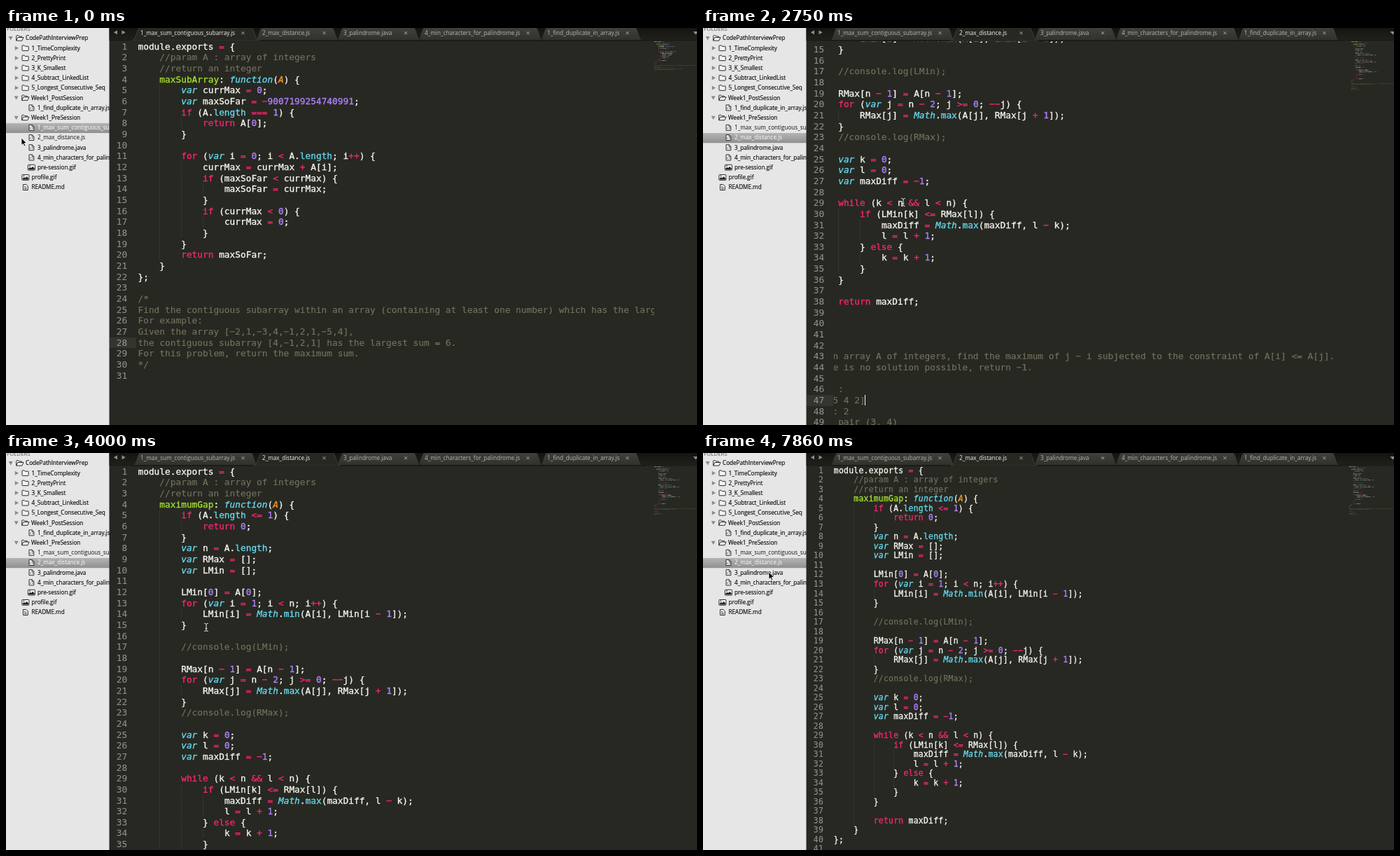
Write an HTML page that moves like this. It is 987 px wide and 567 px high and loops after 8000 ms.

```html
<!DOCTYPE html>
<html lang="en">
<head>
<meta charset="utf-8">
<title>Code editor</title>
<style>
html, body { margin: 0; width: 100%; height: 100%; overflow: hidden; background: #272822; }
#stage {
  position: relative; width: 987px; height: 567px; overflow: hidden;
  animation: edit 8s step-end infinite;
}
svg { position: absolute; left: 0; top: 0; }
svg text { font: 8.15px "Open Sans", "Noto Sans", sans-serif; white-space: pre; }
#tree text { stroke: currentColor; stroke-width: .18px; color: #111; }
#tree text[class] { stroke: none; }

/* editor: scroll position, type size and which document is open */
@keyframes edit {
  0% {
    --a: visible; --b: hidden; --row-a: #fff; --row-b: #111; --tab-a: #f4f4f0; --tab-b: #b8b8b3;
    --sx: 0px; --sy: 0px; --fs: 12.8px; --adv: 7.71px; --lh: 15.65px; --cx: 188.5px; --mx: 926px;
  }
  20.75% {
    --a: hidden; --b: visible; --row-a: #111; --row-b: #fff; --tab-a: #b8b8b3; --tab-b: #f4f4f0;
    --sx: -57px; --sy: -215px;
  }
  36.25% { --sx: -49px; --sy: -62.6px; }
  38.125% { --sx: -45.6px; --sy: 0px; }
  47.75% { --sx: -38px; }
  50% { --sx: 0px; --fs: 12.8px; --adv: 7.71px; --lh: 15.65px; --cx: 188.5px; --mx: 926px; }
  69.5% { --fs: 12.1px; --adv: 7.29px; --lh: 14.94px; --cx: 187.6px; --mx: 923px; }
  80.75%, 100% {
    --a: hidden; --b: visible; --row-a: #111; --row-b: #fff; --tab-a: #b8b8b3; --tab-b: #f4f4f0;
    --sx: 0px; --sy: 0px; --fs: 11.38px; --adv: 7.12px; --lh: 13.52px; --cx: 186.8px; --mx: 923px;
  }
}
.a { visibility: var(--a); }
.b { visibility: var(--b); }
.row-a { fill: var(--row-a); }
.row-b { fill: var(--row-b); }
.tab-a { fill: var(--tab-a); }
.tab-b { fill: var(--tab-b); }

.gutter, .pane { position: absolute; top: 19px; height: 548px; overflow: hidden; }
.gutter { left: 148px; width: 38px; }
.pane { left: 187px; width: calc(var(--mx) - 187px); }
pre {
  position: absolute; margin: 0; top: calc(var(--sy) - .2px); color: #f8f8f2;
  font: var(--fs)/var(--lh) "DejaVu Sans Mono", "Liberation Mono", monospace;
  letter-spacing: calc(var(--adv) - var(--fs) * .60205);
  -webkit-text-stroke: .32px currentColor;
}
.nums { left: 9.8px; color: #8f908a; -webkit-text-stroke-width: .1px; }
.code { left: calc(var(--cx) - 187px + var(--sx)); }
.mini {
  --fs: 12.8px; --adv: 7.71px; --lh: 15.65px;
  left: var(--mx); top: 18.7px; opacity: .9;
  transform: scale(.0923, .0909); transform-origin: 0 0;
}
.current {
  position: absolute; left: 0; width: 38px; height: var(--lh); background: #34352f;
  top: calc(var(--sy) + .2px + var(--lh) * (var(--n) - 1));
}
.caret {
  position: absolute; left: calc(var(--adv) * 13 - .6px); top: calc(var(--lh) * 46);
  width: 1.2px; height: 15.6px; background: #f8f8f0; animation: blink 8s step-end infinite;
}
@keyframes blink {
  0% { opacity: 0; } 20.75% { opacity: 1; } 27.125% { opacity: 0; }
  32.625% { opacity: .5; } 34.375%, 100% { opacity: 1; }
}
.code i { box-shadow: inset 1px 0 #34352e; }
.cm { color: #75715e; -webkit-text-stroke-width: .15px; }
.kw { color: #f92672; }
.ty, .fn { color: #66d9ef; }
.num { color: #ae81ff; }
.name { color: #a6e22e; }
.arg { color: #fd971f; }
.ty, .arg { font-style: italic; }

#pointer { animation: point 8s step-end infinite; }
#pointer .arrow { visibility: var(--arrow); }
#pointer .beam { visibility: var(--beam); }
@keyframes point {
  0% { transform: translate(22px, 157px); --arrow: visible; --beam: hidden; }
  1.75% { transform: translate(75.5px, 149px); }
  4% { transform: translate(85px, 152px); }
  5.875% { transform: translate(85px, 153.7px); }
  9.625% { transform: translate(85px, 154.7px); }
  11.375% { transform: translate(85.5px, 155.7px); }
  29% { transform: translate(212px, 212px); --arrow: hidden; --beam: visible; }
  30.75% { transform: translate(286px, 249px); }
  86.75% { transform: translate(262px, 247.5px); }
  88.875% { transform: translate(204px, 200px); }
  92.625% { transform: translate(104px, 187px); --arrow: visible; --beam: hidden; }
  94.5% { transform: translate(99px, 182px); }
  96.375% { transform: translate(94.5px, 172px); }
  98.25%, 100% { transform: translate(94px, 170px); --arrow: visible; --beam: hidden; }
}
</style>
</head>
<body>
<div id="stage">
  <svg width="987" height="567">
    <defs>
      <linearGradient id="pick" x2="0" y2="1"><stop stop-color="#b4b4b4"/><stop offset="1" stop-color="#909090"/></linearGradient>
      <linearGradient id="bar" x2="0" y2="1"><stop stop-color="#141511"/><stop offset="1" stop-color="#20211c"/></linearGradient>
      <linearGradient id="tab" x2="0" y2="1"><stop stop-color="#40413c"/><stop offset="1" stop-color="#30312c"/></linearGradient>
      <g id="file" fill="#fafafa" stroke="#222" stroke-width=".95">
        <path d="M.5-4H4.8L7.3-1.6V4H.5Z"/>
        <path d="M4.6-4V-1.4H7.3M3-.4L1.9.9 3 2.2M4.8-.4L5.9.9 4.8 2.2" fill="none" stroke-width=".8"/>
      </g>
      <g id="note" fill="#fafafa" stroke="#222" stroke-width=".95">
        <path d="M.5-4H4.8L7.3-1.6V4H.5Z"/>
        <path d="M2-1.2H4M2 .6H5.8M2 2.3H5.8" stroke-width=".8"/>
      </g>
      <path id="closed" d="M.5 3V-3Q.5-3.8 1.3-3.8H3.6L4.8-2.5H9Q9.7-2.5 9.7-1.8V3Q9.7 3.7 9 3.7H1.2Q.5 3.7 .5 3Z" fill="#f4f4f4" stroke="#222" stroke-width=".95"/>
      <path id="open" d="M.7 3.5V-3.1Q.7-3.8 1.4-3.8H3.6L4.8-2.5H8.3V-1M.7 3.5L2.8-1H11L8.9 3.6H.7Z" fill="#f4f4f4" stroke="#222" stroke-width=".95"/>
      <g id="image">
        <rect x=".4" y="-3.8" width="10" height="7.8" rx=".8" fill="#fafafa" stroke="#222" stroke-width=".95"/>
        <path d="M1.2 3.2V1.6L3.4-.4 5 1 7.2-1.4 9.6 1.4V3.2Z" fill="#222"/>
        <circle cx="3" cy="-2" r=".9" fill="#222"/>
      </g>
    </defs>
    <rect width="148" height="567" fill="#e6e6e6"/>
    <rect class="a" y="135.8" width="148" height="14.2" fill="url(#pick)"/>
    <rect class="b" y="150" width="148" height="14.2" fill="url(#pick)"/>
    <text x="1" y="3.7" fill="#777" style="font-size:7.8px;font-weight:600">FOLDERS</text>
    <g id="tree"></g>
    <rect x="147.5" width="840" height="567" fill="#272822"/>
    <rect x="147.5" width="840" height="18" fill="url(#bar)"/>
    <path d="M159 3.2V9.2L153.8 6.2ZM165.5 3.2V9.2L170.7 6.2ZM981.5 5H989L985.2 9.5Z" fill="#8d8e89"/>
    <g id="tabs"></g>
  </svg>
  <div id="docs"></div>
  <svg width="987" height="567">
    <g id="pointer">
      <path class="arrow" d="M0 0V10.4L2.4 8.2 4 11.8 5.8 11 4.2 7.5H7.5Z" fill="#000" stroke="#fff" stroke-width=".8"/>
      <path class="beam" d="M-2.7-5.6Q0-5.6 0-4.2Q0-5.6 2.7-5.6M0-4.4V4.4M-2.7 5.6Q0 5.6 0 4.2Q0 5.6 2.7 5.6M-1.5 1.8H1.5" fill="none" stroke="#e8e8e4" stroke-width="1"/>
    </g>
  </svg>
</div>
<script>
const byId = id => document.getElementById(id);

// sidebar: icon, text x, label, row class
const rows = [
  ['open', 28, 'CodePathInterviewPrep'],
  ['closed', 36.5, '1_TimeComplexity'],
  ['closed', 36.5, '2_PrettyPrint'],
  ['closed', 36.5, '3_K_Smallest'],
  ['closed', 36.5, '4_Subtract_LinkedList'],
  ['closed', 36.5, '5_Longest_Consecutive_Seq'],
  ['open', 36, 'Week1_PostSession'],
  ['file', 45, '1_find_duplicate_in_array.js'],
  ['open', 36, 'Week1_PreSession'],
  ['file', 45, '1_max_sum_contiguous_subarray.js', 'row-a'],
  ['file', 45, '2_max_distance.js', 'row-b'],
  ['file', 45, '3_palindrome.java'],
  ['file', 45, '4_min_characters_for_palindrome.js'],
  ['image', 45, 'pre-session.gif'],
  ['image', 36.5, 'profile.gif'],
  ['note', 36.5, 'README.md']
];
const arrows = { open: 'M-3-2.4H3L0 2.9Z', closed: 'M-2.4-3V3L2.9 0Z' };

byId('tree').innerHTML = rows.map(([icon, x, label, cls], i) => {
  const y = 14.5 + 14.2 * i;
  const gap = icon === 'file' || icon === 'note' ? 12.5 : 14;
  const arrow = arrows[icon]
    ? `<path d="${arrows[icon]}" transform="translate(${x - 21.3} ${y})" fill="#8a8a8a"/>` : '';
  return `${arrow}<use href="#${icon}" x="${x - gap}" y="${y}"/>
    <text ${cls ? `class="${cls}"` : ''} x="${x}" y="${y + 2.8}" fill="#111">${label}</text>`;
}).join('');

// tabs: label, text x, close button x, text class, open class
const tabs = [
  ['1_max_sum_contiguous_subarray.js', 192, 338.5, 'tab-a', 'a'],
  ['2_max_distance.js', 366, 454.5, 'tab-b', 'b'],
  ['3_palindrome.java', 482, 571],
  ['4_min_characters_for_palindrome.js', 598, 745.5],
  ['1_find_duplicate_in_array.js', 773, 887.5]
];
const tabPath = (x, close) => {
  const l = x - 12, r = close + 23;
  return `M${l} 18C${l + 7} 17 ${l + 6}-1 ${l + 13}-1H${r - 13}C${r - 6}-1 ${r - 7} 17 ${r} 18Z`;
};
const shape = (tab, attrs) => `<path d="${tabPath(tab[1], tab[2])}" ${attrs}/>`;

byId('tabs').innerHTML =
  [...tabs].reverse().map(t => shape(t, 'fill="url(#tab)" stroke="#161713" stroke-width=".9"')).join('') +
  '<path d="M148 17.7H987" stroke="#161713" stroke-width=".8"/>' +
  tabs.slice(0, 2).map(t =>
    shape(t, `class="${t[4]}" fill="#272822" stroke="#4b4c46" stroke-width=".7"`) +
    `<path class="${t[4]}" d="M${t[1] - 11} 18.2H${t[2] + 22}" stroke="#272822" stroke-width="1.6"/>`).join('') +
  tabs.map(([label, x, close, cls = '']) =>
    `<text class="${cls}" x="${x}" y="9.9" fill="#b8b8b3">${label}</text>
     <path d="M${close - 2} 5.2l4 4m0-4l-4 4" stroke="#a9aaa4" stroke-width="1"/>`).join('');

const sumSource = `module.exports = {
    //param A : array of integers
    //return an integer
    maxSubArray: function(A) {
        var currMax = 0;
        var maxSoFar = -9007199254740991;
        if (A.length === 1) {
            return A[0];
        }

        for (var i = 0; i < A.length; i++) {
            currMax = currMax + A[i];
            if (maxSoFar < currMax) {
                maxSoFar = currMax;
            }
            if (currMax < 0) {
                currMax = 0;
            }
        }
        return maxSoFar;
    }
};

/*
Find the contiguous subarray within an array (containing at least one number) which has the largest sum.
For example:
Given the array [-2,1,-3,4,-1,2,1,-5,4],
the contiguous subarray [4,-1,2,1] has the largest sum = 6.
For this problem, return the maximum sum.
*/
`;
const gapSource = `module.exports = {
    //param A : array of integers
    //return an integer
    maximumGap: function(A) {
        if (A.length <= 1) {
            return 0;
        }
        var n = A.length;
        var RMax = [];
        var LMin = [];

        LMin[0] = A[0];
        for (var i = 1; i < n; i++) {
            LMin[i] = Math.min(A[i], LMin[i - 1]);
        }

        //console.log(LMin);

        RMax[n - 1] = A[n - 1];
        for (var j = n - 2; j >= 0; --j) {
            RMax[j] = Math.max(A[j], RMax[j + 1]);
        }
        //console.log(RMax);

        var k = 0;
        var l = 0;
        var maxDiff = -1;

        while (k < n && l < n) {
            if (LMin[k] <= RMax[l]) {
                maxDiff = Math.max(maxDiff, l - k);
                l = l + 1;
            } else {
                k = k + 1;
            }
        }

        return maxDiff;
    }
};

/*
Given an array A of integers, find the maximum of j - i subjected to the constraint of A[i] <= A[j].
If there is no solution possible, return -1.

Example :
A : [3 5 4 2]
Output : 2
for the pair (3, 4)
*/
`;

const token = /(?<cm>\/\/.*)|(?<kw>\b(?:if|for|while|else|return)\b|[-+=<>&]+)|(?<ty>\b(?:var|function|Math)\b)|(?<fn>\b(?:length|max|min)\b)|(?<num>\b\d+)|(?<name>\w+(?=: f))|(?<arg>(?<=function\()\w+)/g;
// the wide minus sign matches the editor font's long hyphen
const escape = s => s.replace(/&/g, '&amp;').replace(/</g, '&lt;').replace(/-/g, '\u2212');
const span = (cls, s) => `<span class="${cls}">${escape(s)}</span>`;

function highlight(source) {
  const lines = source.split('\n');
  const indentOf = i => /\S/.test(lines[i] || '') ? lines[i].search(/\S/) : (lines[i + 1] || '').search(/\S|$/);
  let block = false;
  return lines.map((line, i) => {
    if (line === '/*') block = true;
    if (block) {
      if (line === '*/') block = false;
      return span('cm', line);
    }
    const depth = indentOf(i) / 4;
    const indent = depth ? '    ' + '<i>    </i>'.repeat(depth - 1) : '';
    const code = line.trim().replace(token, (...args) => {
      const groups = args[args.length - 1];
      return span(Object.keys(groups).find(k => groups[k]), args[0]);
    });
    return indent + code;
  }).join('\n');
}

function editor(cls, source, current, extra = '') {
  const html = highlight(source);
  const nums = source.split('\n').map((_, i) => String(i + 1).padStart(2)).join('\n');
  return `<div class="${cls}">
    <div class="gutter"><div class="current" style="--n:${current}"></div><pre class="nums">${nums}</pre></div>
    <div class="pane"><pre class="code">${html}${extra}</pre></div>
    <pre class="mini" aria-hidden="true">${html}</pre>
  </div>`;
}

byId('docs').innerHTML =
  editor('a', sumSource, 28) +
  editor('b', gapSource, 47, '<span class="caret"></span>');
</script>
</body>
</html>
```
